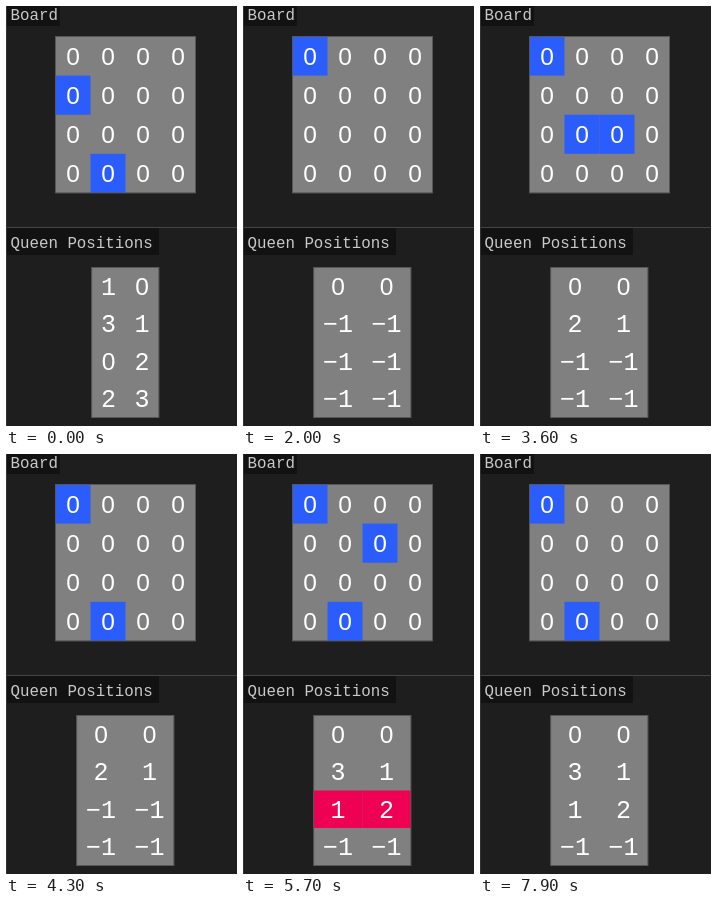
Recreate the animation shown at these times as an HTML page. Size 231 by 420 pixels, loop 8 s.

```html
<!DOCTYPE html>
<html lang="en">
<head>
<meta charset="utf-8">
<title>Four queens</title>
<style>
  html, body { margin: 0; width: 100%; height: 100%; overflow: hidden; background: #1e1e1e; }
  svg { display: block; width: 231px; height: 420px; }
  .label { font: 15.8px "Liberation Mono", "Courier New", monospace; fill: #c9c9c9; }
  .cell { font: 25px "Liberation Mono", "Courier New", monospace; fill: #fff; text-anchor: middle; }
  .zero { font: 24.5px "Liberation Sans", Arial, sans-serif; }
</style>
</head>
<body>
<svg id="stage" viewBox="0 0 231 420">
  <rect width="231" height="420" fill="#1e1e1e"/>
  <rect width="54" height="20" fill="#121212"/>
  <rect y="222" width="153" height="27" fill="#121212"/>
  <rect y="221" width="231" height="1" fill="#444"/>
  <rect width="1" height="420" fill="#333"/>
  <text class="label" x="4.5" y="14">Board</text>
  <text class="label" x="4.5" y="242">Queen Positions</text>
</svg>
<script>
const N = 4, LOOP = 8000, FRAME = 100, STEP = 150, START = 620;
const GREY = '#808080', BLUE = '#2b5dfc', RED = '#ee0052';
const stage = document.getElementById('stage');

function add(tag, attrs) {
  const el = document.createElementNS('http://www.w3.org/2000/svg', tag);
  for (const key in attrs) el.setAttribute(key, attrs[key]);
  return stage.appendChild(el);
}

function set(el, attrs) {
  for (const key in attrs) el.setAttribute(key, attrs[key]);
}

// Grid whose width can change while it stays centred on cx
function makeGrid(cols, cx, top, rowH) {
  const back = add('rect', { y: top, height: rowH * N, fill: GREY });
  const cells = [];
  for (let r = 0; r < N; r++) for (let c = 0; c < cols; c++) {
    cells.push({ r, c, box: add('rect', { y: top + r * rowH, height: rowH }) });
  }
  for (const cell of cells) {
    cell.text = add('text', { y: top + (cell.r + 0.5) * rowH + 8.5 });
  }
  const edge = add('rect', { y: top, height: rowH * N, fill: 'none', stroke: '#575757' });
  return (colW, value, colour) => {
    const width = colW * cols, left = cx - width / 2;
    set(back, { x: left, width });
    set(edge, { x: left, width });
    for (const { r, c, box, text } of cells) {
      const v = value(r, c), x = left + c * colW;
      set(box, { x, width: colW, fill: colour(r, c) || 'none' });
      set(text, { x: x + colW / 2, class: v === 0 ? 'cell zero' : 'cell' });
      text.textContent = String(v).replace('-', '\u2212');
    }
  };
}

// Backtracking search, one snapshot per visible step
function solve() {
  const queens = Array.from({ length: N }, () => [-1, -1]);
  const chosen = new Set(), patched = new Set(), states = [];
  const snap = () => states.push({
    queens: queens.map(q => q.slice()),
    chosen: new Set(chosen),
    patched: new Set(patched)
  });
  const safe = (row, col) => queens.slice(0, col).every(
    ([r, c]) => r !== row && Math.abs(r - row) !== Math.abs(c - col));

  function place(col) {
    if (col === N) return true;
    let found = false;
    for (let row = 0; row < N && !found; row++) {
      const key = row + ',' + col;
      chosen.add(key); snap();
      if (safe(row, col)) {
        [row, col].forEach((v, i) => {
          queens[col][i] = v;
          patched.add(col + ',' + i); snap();
        });
        [0, 1].forEach(i => { patched.delete(col + ',' + i); snap(); });
        found = place(col + 1);
      }
      chosen.delete(key); snap();
    }
    return found;
  }
  snap();
  place(0);
  return states;
}

const states = solve();
const drawBoard = makeGrid(N, 119.5, 30.5, 39.1);
const drawQueens = makeGrid(2, 119.3, 261.5, 37.5);

// The finished search unwinds first, then a new one begins
function stateAt(t) {
  const end = states.length;
  if (t < 150) return end - 3;
  if (t < 300) return end - 2;
  if (t < 500) return end - 1;
  return Math.max(0, Math.floor((t - START) / STEP));
}

let shown = -1;
function draw(now) {
  const t = Math.floor((now % LOOP) / FRAME) * FRAME;
  const index = stateAt(t);
  if (index !== shown) {
    shown = index;
    const { queens, chosen, patched } = states[index];
    const open = queens.flat().includes(-1);
    drawBoard(35, () => 0, (r, c) => chosen.has(r + ',' + c) && BLUE);
    drawQueens(open ? 48.6 : 33.6, (r, c) => queens[r][c],
      (r, c) => patched.has(r + ',' + c) && RED);
  }
}

const begin = performance.now();
function tick() {
  draw(performance.now() - begin);
  requestAnimationFrame(tick);
}
tick();
</script>
</body>
</html>
```
